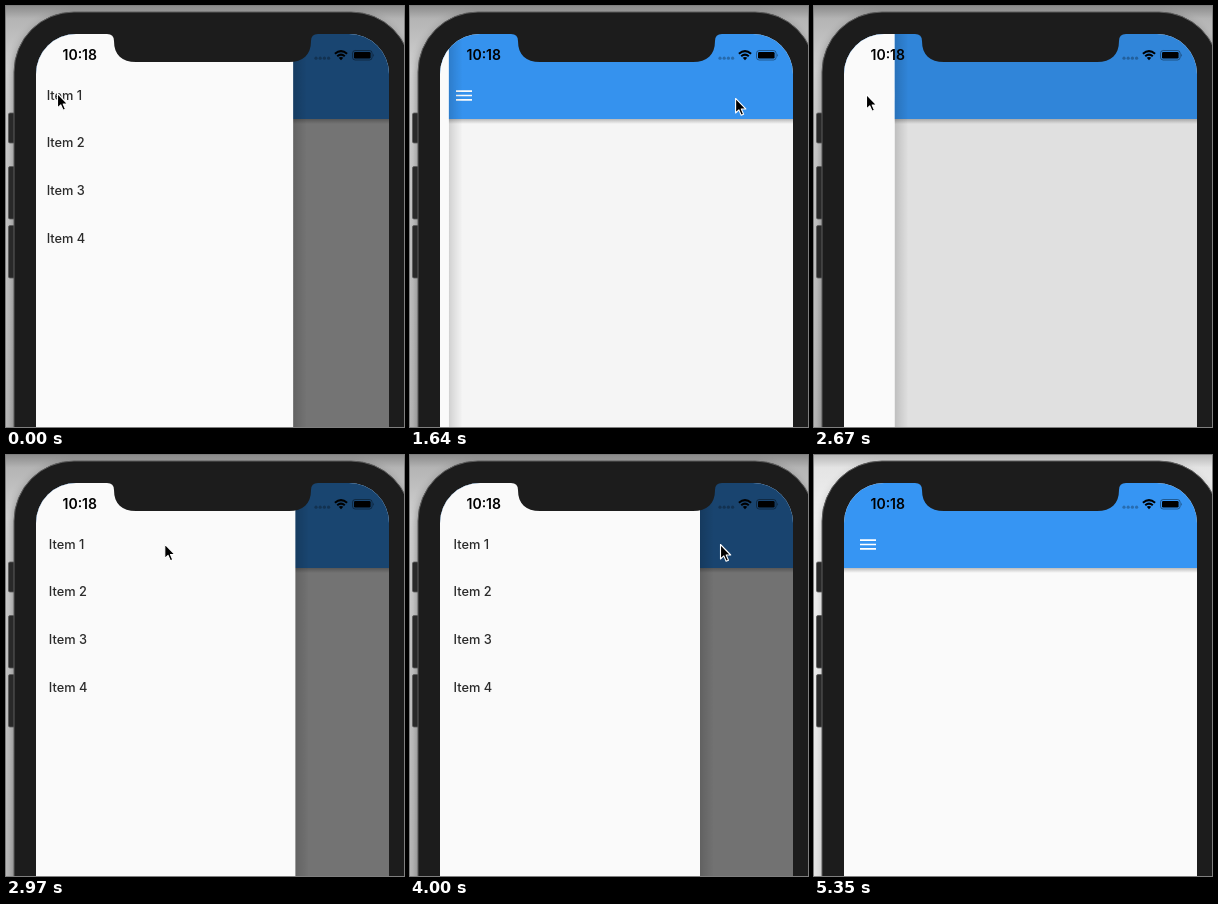
Recreate the animation shown at these times as an HTML page. Size 398 by 421 pixels, loop 5450 ms.

```html
<!DOCTYPE html>
<html lang="en">
<head>
<meta charset="utf-8">
<title>Drawer</title>
<style>
  html, body { margin: 0; width: 100%; height: 100%; overflow: hidden; background: #ddd; }
  svg { display: block; width: 398px; height: 421px; }
  text { font-family: Inter, Roboto, sans-serif; }
</style>
</head>
<body>
<svg viewBox="0 0 398 421">
  <defs>
    <linearGradient id="dim" x2="0" y2="1">
      <stop offset="0" stop-color="#8c8c8c"/>
      <stop offset=".03" stop-color="#b4b4b4"/>
      <stop offset=".15" stop-color="#d2d2d2"/>
      <stop offset=".5" stop-color="#c6c6c6"/>
      <stop offset="1" stop-color="#b8b8b8"/>
    </linearGradient>
    <linearGradient id="pale" x2="0" y2="1">
      <stop offset="0" stop-color="#b8b8b8"/>
      <stop offset=".03" stop-color="#e4e4e4"/>
      <stop offset=".15" stop-color="#f2f2f2"/>
      <stop offset="1" stop-color="#e6e6e6"/>
    </linearGradient>
    <linearGradient id="side">
      <stop offset="0" stop-opacity=".15"/>
      <stop offset=".4" stop-opacity=".09"/>
      <stop offset="1" stop-opacity=".01"/>
    </linearGradient>
    <linearGradient id="under" x2="0" y2="1">
      <stop offset="0" stop-opacity=".25"/>
      <stop offset="1" stop-opacity="0"/>
    </linearGradient>
    <filter id="soft" x="-20%" y="-20%" width="140%" height="140%">
      <feGaussianBlur stdDeviation="5"/>
    </filter>
    <clipPath id="screen"><rect x="30" y="28" width="353" height="500" rx="40"/></clipPath>
  </defs>

  <rect id="back" width="398" height="421"/>
  <rect id="halo" x="8" y="10" width="397" height="520" rx="60" filter="url(#soft)"/>

  <g fill="#292929" stroke="#5a5a5a" stroke-width=".8">
    <rect x="2.5" y="107" width="8" height="30" rx="1.5"/>
    <rect x="2.5" y="160.500" width="8" height="52.500" rx="1.5"/>
    <rect x="2.5" y="219.500" width="8" height="52.500" rx="1.5"/>
  </g>
  <rect x="8" y="6" width="397" height="520" rx="60" fill="#1c1c1c" stroke="#5c5c5c"/>

  <g clip-path="url(#screen)">
    <rect x="30" y="28" width="353" height="400" fill="#fafafa"/>
    <rect x="30" y="113" width="353" height="5" fill="url(#under)"/>
    <rect x="30" y="28" width="353" height="85" fill="#3695f3"/>
    <circle id="ripple" cx="54" cy="89" r="27" fill="#fff" opacity=".2"/>
    <path d="M46 85.200h16M46 89.500h16M46 93.800h16" stroke="#fff" stroke-width="1.700"/>
    <rect id="scrim" x="30" y="28" width="353" height="400"/>
    <g id="drawer">
      <rect x="290" y="28" width="13" height="400" fill="url(#side)"/>
      <rect x="30" y="28" width="260" height="400" fill="#fafafa"/>
      <g id="items" font-size="12.8" font-weight="500" fill="#2b2b2b"></g>
    </g>
  </g>

  <path fill="#1c1c1c" d="M101 27V28Q108 28 108 35C108 49 116 56 130 56H283C297 56 305 49 305 35Q305 28 312 28V27Z"/>

  <text x="56.500" y="54" font-size="14" font-weight="600">10:18</text>
  <g id="dots" opacity=".27"></g>
  <g fill="none" stroke="#000" stroke-width="2">
    <path d="M328.900 47.800Q335 42.400 341.100 47.800M331.200 50.300Q335 46.900 338.800 50.300"/>
  </g>
  <path d="M332.700 51.800Q335 50 337.300 51.800L335 54.300Z"/>
  <rect x="346.500" y="44.500" width="19.600" height="9.500" rx="2.700" fill="none" stroke="#000" stroke-opacity=".4"/>
  <rect x="348" y="46" width="16.600" height="6.500" rx="1.300"/>
  <path d="M367.300 47.500q1.500 1.800 0 3.500z" opacity=".5"/>

  <path id="cursor" d="M.5 .5V15L3.800 11.900 6.100 17.200 8.500 16.200 6.200 11H10.700Z"
        stroke="#fff" stroke-width="1.100" stroke-linejoin="round"/>
</svg>

<script>
const LOOP = 5450, TICK = 148.3, BLUR_AT = 5350;
const $ = id => document.getElementById(id);

function add(parent, tag, attrs, label = '') {
  const el = document.createElementNS('http://www.w3.org/2000/svg', tag);
  for (const k in attrs) el.setAttribute(k, attrs[k]);
  el.textContent = label;
  $(parent).append(el);
}
for (let i = 0; i < 4; i++) {
  add('items', 'text', { x: 43.5, y: 93.6 + i * 47.7 }, 'Item ' + (i + 1));
  add('dots', 'circle', { cx: 310 + i * 4.2, cy: 52.2, r: 1.6 });
}

// Pointer path: time, x, y
const path = [
  [0, 51, 87], [300, 51, 87], [593, 76, 93], [750, 76, 93], [1040, 215, 95],
  [1335, 349, 90], [1484, 347, 90], [1632, 325, 92], [1930, 180, 96],
  [2225, 68, 91], [2520, 51, 88], [2820, 53, 88], [3114, 265, 89],
  [3708, 310, 89], [3860, 310, 89], [4152, 308, 90], [4300, 307, 92],
  [4750, 270, 440], [LOOP, 270, 440]
];

function pointer(t) {
  const i = path.findIndex(k => k[0] > t);
  const [t0, x0, y0] = path[i - 1], [t1, x1, y1] = path[i];
  const u = (t - t0) / (t1 - t0);
  return [x0 + (x1 - x0) * u, y0 + (y1 - y0) * u];
}

// Critically damped spring, 1 falling to 0
function spring(ms) {
  const a = Math.max(0, ms) * 0.025;
  return (1 + a) * Math.exp(-a);
}

function openness(t) {
  if (t < TICK) return 0.989;
  if (t < 2637) return spring(t - 1423);
  if (t < 3857) return 1 - spring(t - 2637);
  return spring(t - 3857);
}

function draw(time) {
  const t = Math.floor(time / TICK) * TICK;
  const away = time >= BLUR_AT;
  const p = openness(t), [x, y] = pointer(t);

  $('drawer').setAttribute('transform', `translate(${(p - 1) * 260} 0)`);
  $('drawer').style.display = p > 0.001 ? '' : 'none';
  $('scrim').setAttribute('opacity', 0.54 * p);
  $('ripple').style.display = t > 2500 && t < 2750 ? '' : 'none';
  $('cursor').setAttribute('transform', `translate(${x} ${y})`);
  $('cursor').style.display = away ? 'none' : '';
  $('back').setAttribute('fill', away ? 'url(#pale)' : 'url(#dim)');
  $('halo').setAttribute('opacity', away ? 0.2 : 0.4);
}

const start = performance.now();
function loop() {
  draw((performance.now() - start) % LOOP);
  requestAnimationFrame(loop);
}
loop();
</script>
</body>
</html>
```
